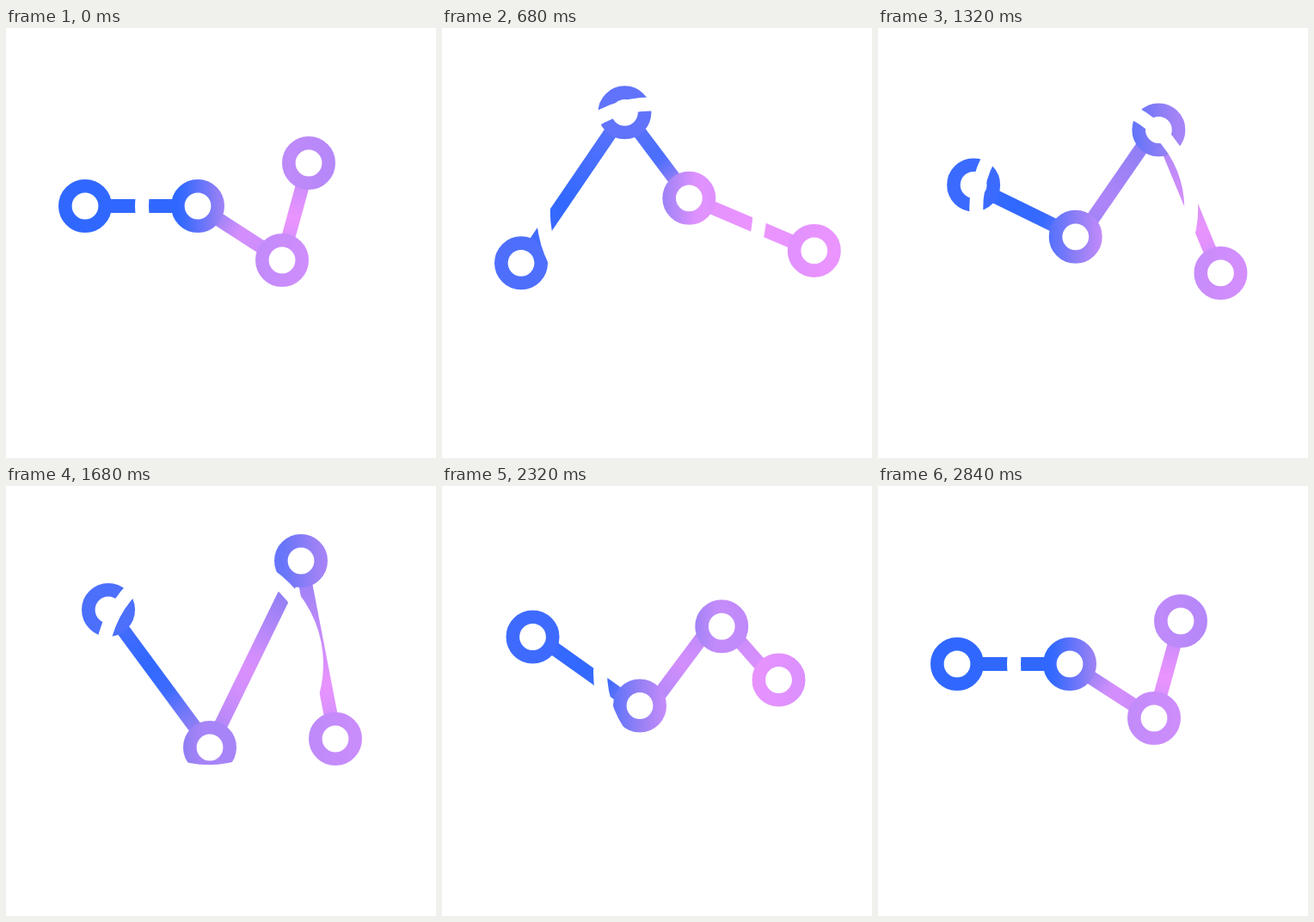
An HTML page with a canvas that plays this animation: 500x500 px, repeating every 3000 ms.

```html
<!DOCTYPE html>
<html>
<head>
<meta charset="utf-8">
<style>
html, body { margin: 0; width: 100%; height: 100%; overflow: hidden; background: #fff; }
canvas { display: block; width: 100vmin; height: 100vmin; }
</style>
</head>
<body>
<canvas id="stage" width="500" height="500"></canvas>
<script>
const ctx = document.getElementById('stage').getContext('2d');
const LOOP = 3000, STEP = 40, TRIM = 26;
const mix = (a, b, p) => a + (b - a) * p;
const clamp = (v, lo, hi) => Math.min(hi, Math.max(lo, v));

// Four nodes, then both ends of each link, trimmed to the rings
function pose(...nodes) {
  const points = [...nodes];
  for (let i = 0; i < 3; i++) {
    const [x0, y0] = nodes[i], [x1, y1] = nodes[i + 1];
    const k = TRIM / Math.hypot(x1 - x0, y1 - y0);
    for (const p of [k, 1 - k]) points.push([mix(x0, x1, p), mix(y0, y1, p)]);
  }
  return points.flat();
}

// Sideways swing of the last two nodes, and of the link ends tied to them
const still = [0, 0], swing3 = [-13.5, -30.5], swing4 = [48, 0];
const swing = [still, still, swing3, swing4, still, still, still, swing3, swing3, swing4].flat();

const flat = pose([92, 207], [223, 207], [321, 270], [352, 157]);
const peak = pose([92, 276], [212, 94], [286, 195], [436, 263]);
const valley = pose([119, 144], [237, 304], [343, 87], [383, 294]);

// Keys: time, value, optional bend of the way leading there
const graph = [[0, flat], [80, flat], [760, peak], [960, peak],
  [1520, valley], [1800, valley], [2840, flat, swing], [LOOP, flat]];
const home = [283, 207, 125], low = [252, 216, 125], mid = [234, 207, 125];
const lens = [[0, home], [80, home], [400, [185, 202, 131]], [760, low], [960, low],
  [1520, mid], [1640, mid], [2080, [318, 219, 126]], [2840, home], [LOOP, home]];

function at(keys, t) {
  const i = keys.findIndex(k => k[0] > t);
  const [t0, from] = keys[i - 1], [t1, to, bend] = keys[i];
  const s = (t - t0) / (t1 - t0), p = s * s * (3 - 2 * s);
  return from.map((v, n) => mix(v, to[n], p) + (bend ? 2 * p * (1 - p) * bend[n] : 0));
}

// Blue on the left, pink on the right, purple away from the middle row
const ramp = [[48, 104, 255], [150, 128, 245], [235, 148, 255]];
function colour(x, y) {
  const off = Math.abs(y - 208 - .3 * (x - 285));
  const pink = clamp((x + y * 2 / 3 - 340) / 90, 0, 1) * Math.max(.6, 1 - off * .004);
  const v = 2 * Math.max(pink, Math.abs(y - 207) * .0022);
  const i = v < 1 ? 0 : 1;
  return `rgb(${ramp[i].map((c, n) => Math.round(mix(c, ramp[i + 1][n], v - i)))})`;
}

function gradient(x0, y0, x1, y1) {
  const g = ctx.createLinearGradient(x0, y0, x1, y1);
  for (let p = 0; p <= 1; p += .125) g.addColorStop(p, colour(mix(x0, x1, p), mix(y0, y1, p)));
  return g;
}

function line(x0, y0, x1, y1, width, style) {
  ctx.beginPath();
  ctx.moveTo(x0, y0);
  ctx.lineTo(x1, y1);
  ctx.lineWidth = width;
  ctx.strokeStyle = style;
  ctx.stroke();
}

function ring(x, y, r, width, style, fill = 'transparent') {
  ctx.beginPath();
  ctx.arc(x, y, r, 0, 2 * Math.PI);
  ctx.fillStyle = fill;
  ctx.fill();
  ctx.lineWidth = width;
  ctx.strokeStyle = style;
  ctx.stroke();
}

function draw(t) {
  const p = at(graph, t), [cx, cy, r] = at(lens, t);
  ctx.fillStyle = '#fff';
  ctx.fillRect(0, 0, 500, 500);
  for (let i = 8; i < 20; i += 4) {
    const ends = p.slice(i, i + 4);
    line(...ends, 16, gradient(...ends));
  }
  for (let i = 0; i < 8; i += 2) {
    const [x, y] = p.slice(i, i + 2);
    ring(x, y, 23.2, 15.6, gradient(x - 31, y, x + 31, y), '#fff');
  }
  // White magnifier passing over the graph
  ring(cx, cy, r, 16, '#fff');
  line(cx - 92, cy + 92, cx - 130, cy + 130, 56, '#fff');
}

function tick() {
  draw(Math.floor(performance.now() % LOOP / STEP) * STEP);
  requestAnimationFrame(tick);
}
tick();
</script>
</body>
</html>
```
